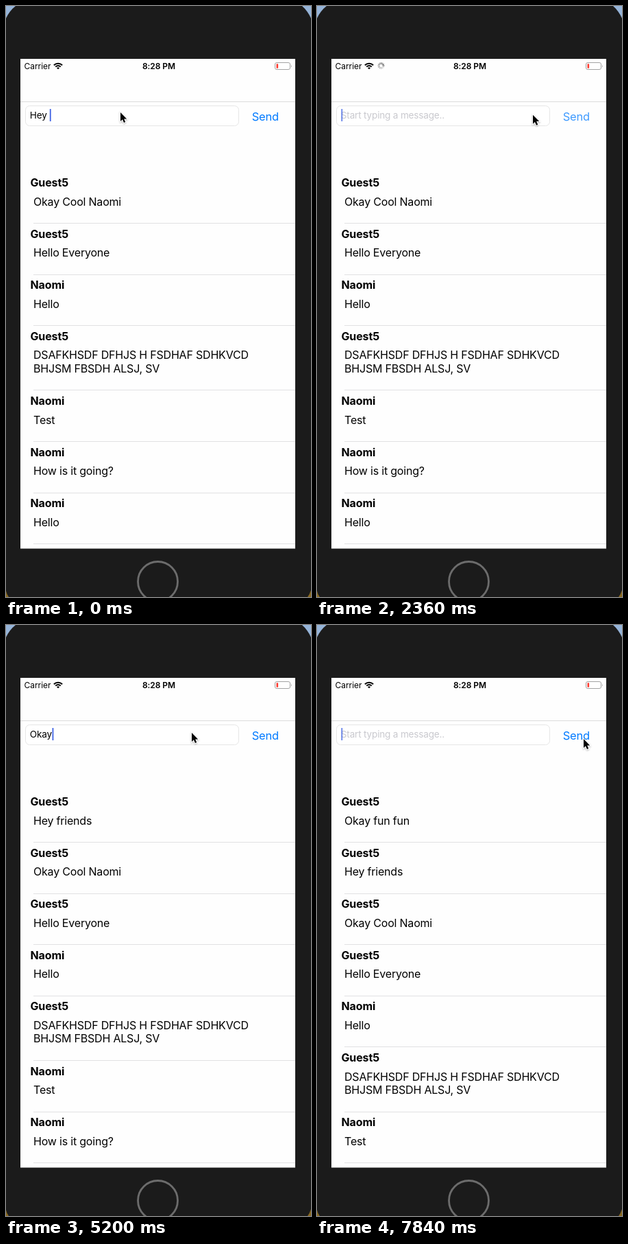
These frames come from a looping animation (445 px wide and 861 px high, 7.99 s). An HTML page:

```html
<!DOCTYPE html>
<html lang="en">
<head>
<meta charset="utf-8">
<title>Chat</title>
<style>
  html, body { margin: 0; width: 100%; height: 100%; overflow: hidden; background: #1b1b1b; }
  svg { display: block; width: 100vw; height: 100vh; }
  text { font-family: Inter, Roboto, sans-serif; font-size: 16px; letter-spacing: -.2px; }
  .name { font-weight: 700; letter-spacing: -.1px; }
  .status { font-size: 12px; letter-spacing: -.05px; }
  .field { font-size: 13.6px; }
  .send { font-size: 16.5px; fill: #007aff; }
  .line { stroke: #e1e1e3; }
</style>
</head>
<body>
<svg viewBox="0 0 445 861" preserveAspectRatio="none">
  <defs>
    <clipPath id="screen"><rect x="21" y="77" width="401" height="713.5"/></clipPath>
    <filter id="shade" x="-50%" y="-50%" width="200%" height="200%">
      <feDropShadow dx="0" dy="1" stdDeviation="1" flood-opacity=".35"/>
    </filter>
  </defs>

  <rect width="445" height="430" fill="#96b4d8"/>
  <rect y="430" width="445" height="431" fill="#8a6a22"/>
  <path d="M14 0H432Q440 7 445 18V851Q443 857 440 861H4Q1 857 0 852V18Q5 7 14 0Z" fill="#1b1b1b"/>
  <circle cx="221.5" cy="838.5" r="29" fill="none" stroke="#6c6c6c" stroke-width="2.8"/>
  <rect x="21" y="77" width="401" height="713.5" fill="#fefefe"/>

  <text class="status" x="26.5" y="92">Carrier</text>
  <text class="status" x="223" y="92" text-anchor="middle" font-weight="600">8:28 PM</text>
  <g fill="none" stroke="#000" stroke-width="2">
    <path d="M69.9 86.2A8.6 8.6 0 0 1 82.1 86.2"/>
    <path d="M72.3 88.6A5.2 5.2 0 0 1 79.7 88.6"/>
    <path d="M76 92.3L74 90.3A2.8 2.8 0 0 1 78 90.3Z" fill="#000" stroke="none"/>
  </g>
  <g id="spinner" stroke="#333" stroke-linecap="round"></g>
  <rect x="392.5" y="82.5" width="22" height="10" rx="2.5" fill="none" stroke="#a3a3a3"/>
  <rect x="394.5" y="84.3" width="2.6" height="6.4" rx=".8" fill="#ff3b30"/>
  <path d="M416 85.5Q417.6 87.5 416 89.5Z" fill="#a3a3a3"/>

  <path d="M21 139.5H422" stroke="#dcdcdc"/>
  <rect x="28.5" y="145.5" width="311" height="29" rx="6" fill="#fff" stroke="#e6e6e6"/>
  <text id="field" class="field" x="34.8" y="164.3"></text>
  <rect id="caret" y="150" width="1.8" height="18" fill="#3f63e4"/>
  <text id="send" class="send" x="358.7" y="167.3">Send</text>
  <g id="list" clip-path="url(#screen)"></g>
  <path id="mouse" d="M0 0V13L2.9 10.3L5 15L7.2 14L5.2 9.4H9.2Z" stroke="#fff" stroke-width="1.8"
    paint-order="stroke" filter="url(#shade)"/>
</svg>
<script>
const LOOP = 7990, STEP = LOOP / 54;
const A = 'Guest5', B = 'Naomi';

// Typing bursts, then the moment Send is released and the moment the message is listed.
const drafts = [
  { bursts: [{ s: 'Hey ', from: -1, to: 0 }, { s: 'friends', from: 0, to: 740 }], sent: 2200, posted: 2500 },
  { bursts: [{ s: 'Oka', from: 3400, to: 3990 }, { s: 'y', from: 4290, to: 4435 }, { s: ' fun fun', from: 5175, to: 6210 }],
    sent: 7240, posted: 7390 }
];
const home = { x: 167, y: 155 };
const moves = [
  { x: 377.5, y: 161, from: 1180, to: 1770 },
  { x: 271, y: 157, from: 2200, to: 2500 },
  { x: 389, y: 166, from: 6210, to: 6960 }
];
const chat = [
  [A, 'Okay fun fun'], [A, 'Hey friends'], [A, 'Okay Cool ' + B], [A, 'Hello Everyone'], [B, 'Hello'],
  [A, 'DSAFKHSDF DFHJS H FSDHAF SDHKVCD', 'BHJSM FBSDH ALSJ, SV'],
  [B, 'Test'], [B, 'How is it going?'], [B, 'Hello']
];

const $ = id => document.getElementById(id);
const set = (id, attrs) => Object.entries(attrs).forEach(([k, v]) => $(id).setAttribute(k, v));
const clamp = v => Math.min(1, Math.max(0, v));
const progress = (t, { from, to }) => clamp((t - from) / (to - from));
const ease = p => p * p * (3 - 2 * p);

function typed(t) {
  const { bursts } = drafts.find(d => t < d.sent) || { bursts: [] };
  return bursts.map(b => b.s.slice(0, Math.floor(b.s.length * progress(t, b)))).join('');
}

function pointer(t) {
  return moves.reduce((p, m) => {
    const k = ease(progress(t, m));
    return { x: p.x + (m.x - p.x) * k, y: p.y + (m.y - p.y) * k };
  }, home);
}

// Dimmed while pressed, then fading back after release.
function sendOpacity(t) {
  return Math.min(...drafts.map(({ sent }) => {
    const age = t - sent;
    return age < -STEP ? 1 : age < 0 ? .2 : clamp(.42 + age / 500);
  }));
}

// Solid while typing or empty, blinking when idle.
function caretOpacity(t, s) {
  const last = Math.max(...drafts.flatMap(d => d.bursts)
    .filter(b => b.from <= t).map(b => Math.min(t, b.to)));
  return !s ? .8 : (t - last) % 1200 < 760 ? 1 : 0;
}

function rows(messages) {
  let y = 241.8;
  return messages.map(([name, ...lines]) => {
    const head = `<text class="name" x="35.4" y="${y + 21.2}">${name}</text>`;
    const body = lines.map((s, i) => `<text x="40" y="${y + 48.7 + i * 19.4}">${s}</text>`).join('');
    y += 74.6 + (lines.length - 1) * 19.7;
    return `${head}${body}<path class="line" d="M40 ${Math.floor(y) + .5}H422"/>`;
  }).join('');
}

$('spinner').innerHTML = Array.from({ length: 12 }, (_, i) =>
  `<path d="M0 -2.6V-4.6" transform="rotate(${i * 30})" opacity="${.25 + i * .06}"/>`).join('');

let pending, content;
function draw(t) {
  const waiting = drafts.filter(d => t < d.posted).length;
  if (waiting !== pending) $('list').innerHTML = rows(chat.slice(pending = waiting));

  const s = typed(t);
  if (s !== content) {
    content = s;
    $('field').textContent = s.replace(/ /g, '\u00a0') || 'Start typing a message..';
    set('field', { fill: s ? '#000' : '#c9c9ce' });
    set('caret', { x: 35.4 + (s && $('field').getComputedTextLength()) * 1 });
  }

  const { x, y } = pointer(t);
  const busy = drafts.some(d => t >= d.sent && t < d.posted + STEP);
  set('caret', { opacity: caretOpacity(t, s) });
  set('send', { opacity: sendOpacity(t) });
  set('mouse', { transform: `translate(${x} ${y})` });
  set('spinner', { opacity: +busy, transform: `translate(93.5 87) rotate(${Math.floor(t / 84) * 30})` });
}

const start = performance.now();
function tick() {
  const t = (performance.now() - start) % LOOP;
  draw(Math.floor((t + 10) / STEP) * STEP);
  requestAnimationFrame(tick);
}
tick();
</script>
</body>
</html>
```
